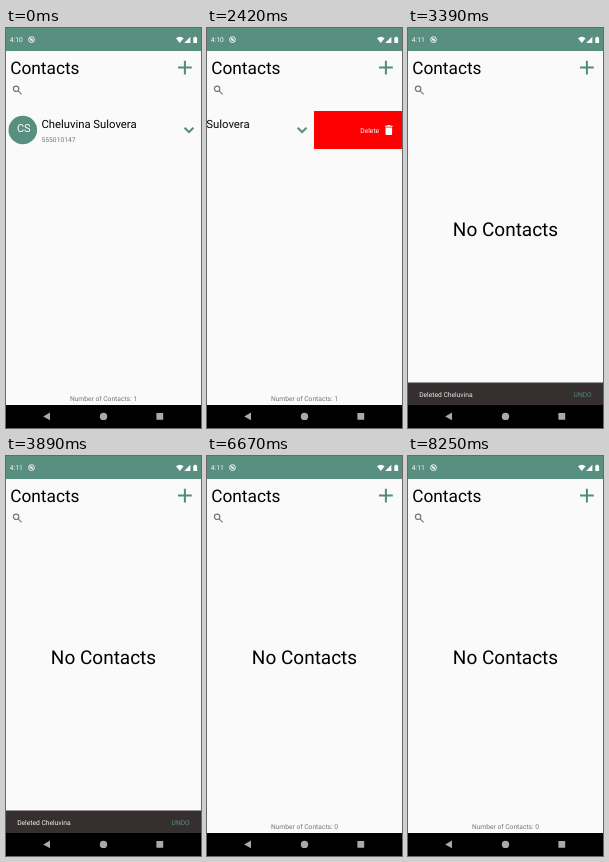
An HTML page that plays this animation: 195 by 400 pixels, repeating every 9410 ms.

```html
<!DOCTYPE html>
<html lang="en">
<head>
<meta charset="utf-8">
<title>Contacts</title>
<style>
html, body { margin: 0; width: 100%; height: 100%; overflow: hidden; background: #fafafa; }
svg { display: block; width: 100%; height: 100%; }
text { font: 6.7px Roboto, sans-serif; text-rendering: geometricPrecision; }
.mid { text-anchor: middle; }
.white { fill: #fff; }
.grey { fill: #777; }
.green { fill: #588f7f; }
.line { fill: none; stroke: #4f8c7b; stroke-width: 2; }
.title { font-size: 17.3px; }
.name { font-size: 11.3px; }
.initials { font-size: 11px; }
.empty { font-size: 19px; }

.row, .snack, .label, .before, .after, .clock-a, .clock-b { animation: 9410ms linear infinite; }
.row { animation-name: swipe; }
.snack { animation-name: slide; }
.label { animation-name: fade; }
.before { animation-name: leave; animation-timing-function: step-end; }
.after { animation-name: arrive; animation-timing-function: step-end; }
.clock-a { animation-name: tick-off; animation-timing-function: step-end; }
.clock-b { animation-name: tick-on; animation-timing-function: step-end; }

@keyframes swipe {
  0%, 23.27% { transform: translateX(0); animation-timing-function: cubic-bezier(.4, .1, .8, .8); }
  25.717% { transform: translateX(-87.5px); }
  26.78% { transform: translateX(-128px); animation-timing-function: cubic-bezier(.3, .4, .4, 1); }
  29.118%, 100% { transform: translateX(-195px); }
}
@keyframes slide {
  0%, 33.475% { transform: translateY(23px); animation-timing-function: cubic-bezier(.4, 0, .2, 1); }
  36.132% { transform: translateY(0); }
  65.25% { transform: translateY(0); animation-timing-function: cubic-bezier(.4, 0, .2, 1); }
  67.906%, 100% { transform: translateY(23px); }
}
@keyframes fade {
  0%, 34.219% { opacity: 0; }
  36.132%, 65.25% { opacity: 1; }
  67.163%, 100% { opacity: 0; }
}
@keyframes leave { 0% { visibility: visible; } 33.262%, 100% { visibility: hidden; } }
@keyframes arrive { 0% { visibility: hidden; } 33.262%, 100% { visibility: visible; } }
@keyframes tick-off { 0% { visibility: visible; } 33.794%, 100% { visibility: hidden; } }
@keyframes tick-on { 0% { visibility: hidden; } 33.794%, 100% { visibility: visible; } }
</style>
</head>
<body>
<svg viewBox="0 0 195 400">
  <rect width="195" height="400" fill="#fafafa"/>

  <!-- status bar -->
  <rect class="green" width="195" height="23"/>
  <g class="white">
    <text class="clock-a" x="3.8" y="14">4:10</text>
    <text class="clock-b" x="3.8" y="14">4:11</text>
    <circle cx="25.5" cy="11.6" r="2.9" fill="none" stroke="#fff" stroke-width=".9"/>
    <path d="M23.5 9.8L27.3 13.6" stroke="#fff" stroke-width="1"/>
    <circle cx="25.5" cy="11.6" r="1.2"/>
    <path d="M170 10.3Q173.8 7.3 177.6 10.3L173.8 15Z"/>
    <path d="M184.4 8.8V15H178.2Z"/>
    <path d="M187.3 9.4H188.4V8.7H190V9.4H191.1V15H187.3Z"/>
  </g>

  <!-- header -->
  <text class="title" x="4.2" y="46.3">Contacts</text>
  <path class="line" d="M172 39.6H185.8M178.9 32.7V46.5"/>
  <g fill="none" stroke="#777" stroke-width="1.2">
    <circle cx="10.1" cy="60.8" r="2.7"/>
    <path d="M12.1 62.8L15.6 66.3"/>
  </g>

  <!-- list -->
  <g class="before">
    <rect y="83" width="195" height="38" fill="#f00"/>
    <g class="white">
      <text x="153.3" y="105">Delete</text>
      <path d="M178 97.7H180L180.6 97H183L183.6 97.7H185.6V98.8H178ZM178.5 99.4H185.1V106Q185.1 107 184.1 107H179.5Q178.5 107 178.5 106Z"/>
    </g>
    <g class="row">
      <rect y="83" width="195" height="38" fill="#fafafa"/>
      <circle class="green" cx="16.8" cy="102" r="14.3"/>
      <text class="initials mid white" x="17.8" y="104.3">CS</text>
      <text class="name" x="35.4" y="100">Cheluvina Sulovera</text>
      <text class="grey" x="35.6" y="114.4">555010147</text>
      <path class="line" d="M178.6 99.8L183 104.2L187.4 99.8"/>
    </g>
    <text class="grey mid" x="97.5" y="373">Number of Contacts: 1</text>
  </g>
  <g class="after">
    <text class="empty mid" x="97.5" y="208">No Contacts</text>
    <text class="grey mid" x="97.5" y="373">Number of Contacts: 0</text>
  </g>

  <!-- snackbar -->
  <g class="snack">
    <rect y="354.5" width="195" height="23" fill="#352f30"/>
    <g class="label">
      <text x="11.2" y="368.7" fill="#f4f4f4">Deleted Cheluvina</text>
      <text class="green" x="165.6" y="368.7">UNDO</text>
    </g>
  </g>

  <!-- navigation bar -->
  <rect y="377" width="195" height="23"/>
  <g fill="#aaa">
    <path d="M44 384.6V392.2L37.2 388.4Z"/>
    <circle cx="97.5" cy="388.4" r="3.7"/>
    <rect x="150.4" y="385" width="6.8" height="6.8" rx=".5"/>
  </g>
</svg>
</body>
</html>
```
